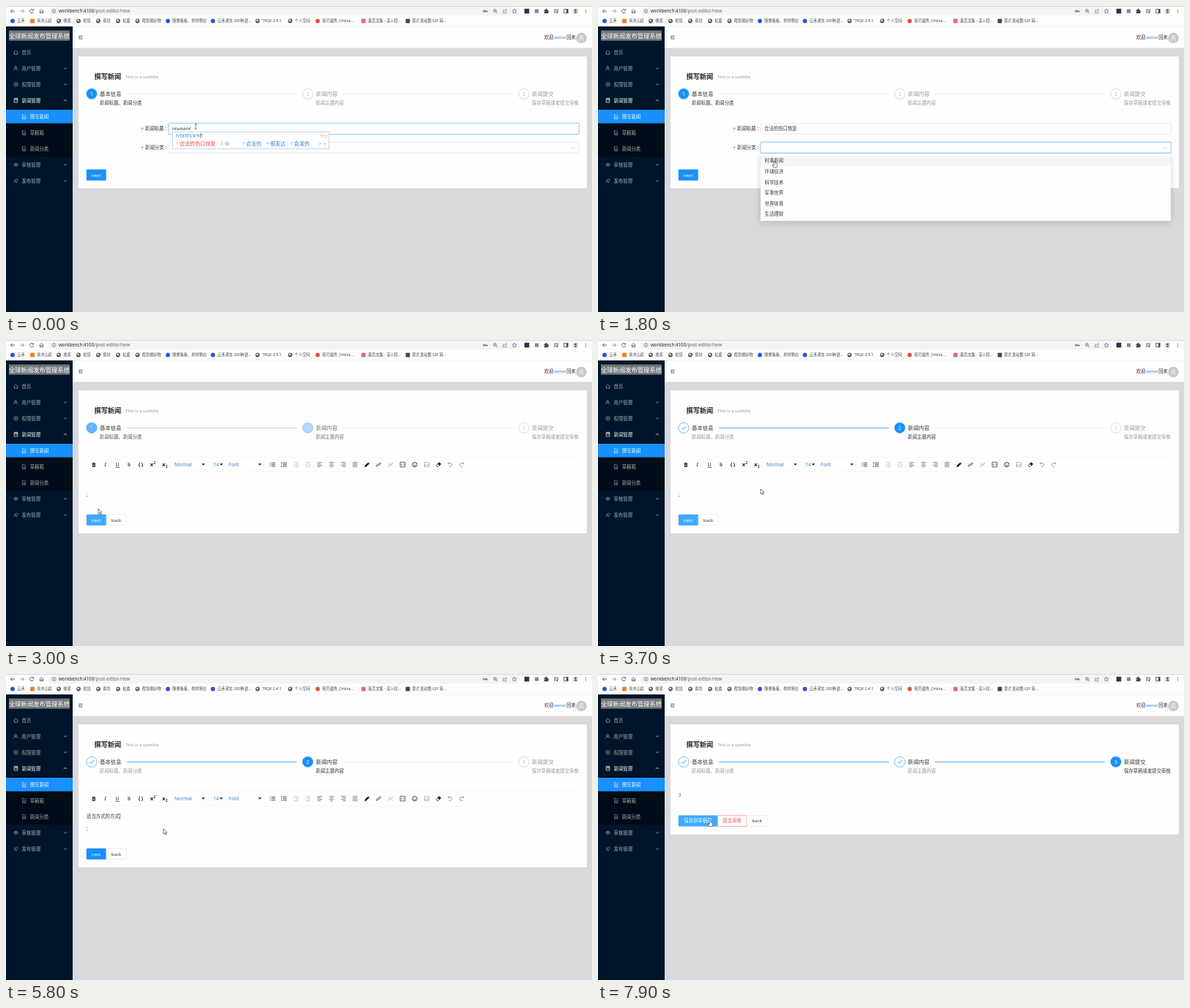
Animation of 800x419 px, one loop 8 s. Source, as an HTML page:

```html
<!DOCTYPE html>
<html lang="zh">
<head>
<meta charset="utf-8">
<title>News editor</title>
<style>
html, body { margin: 0; width: 100%; height: 100%; overflow: hidden; background: #d9d8da; }
svg { display: block; width: 100vw; height: 100vh; }
text { font-family: "Noto Sans", "Noto Sans CJK SC", "Noto Sans CJK", sans-serif; white-space: pre; }
</style>
</head>
<body>
<svg id="stage" viewBox="0 0 800 419"></svg>
<script>
const BLUE = '#1890ff', HOVER = '#40a9ff', INK = '#333', MUTED = '#969696', PALE = '#c4c4c4', WHITE = '#fefefe';
const LOOP = 8000, PAGE_2 = 2900, PAGE_3 = 6450, FADE = 300;

// Drawing helpers; text is placed by its vertical middle.
const text = (x, y, s, fill = INK, size = 6.4, more = '') =>
  `<text x="${x}" y="${y + size * .37}" font-size="${size}" fill="${fill}" ${more}>${s}</text>`;
const rect = (x, y, w, h, fill, more = '') =>
  `<rect x="${x}" y="${y}" width="${w}" height="${h}" fill="${fill}" ${more}/>`;
const disc = (x, y, r, fill, more = '') => `<circle cx="${x}" cy="${y}" r="${r}" fill="${fill}" ${more}/>`;
const path = (d, stroke = '#444', width = .7, fill = 'none') =>
  `<path d="${d}" stroke="${stroke}" stroke-width="${width}" fill="${fill}"/>`;
const at = (x, y, body) => `<g transform="translate(${x} ${y})">${body}</g>`;
const group = (id, body) => `<g id="${id}">${body}</g>`;
const edge = (color, width = .5) => `stroke="${color}" stroke-width="${width}" rx="1"`;
const caret = (id, x, y) => rect(x, y - 4, .6, 8, '#222', `id="${id}"`);
const centered = 'text-anchor="middle"';

function browserBar() {
  const globe = disc(0, 0, 2.9, '#4b4f53') + path('M-2 -.9L0 -1.8 .8 -.4 -.7 .5ZM.4 1.8L2 .3', '#eee', .6, '#eee');
  const dot = color => disc(0, 0, 2.9, color);
  const square = color => rect(-2.9, -2.9, 5.8, 5.8, color);
  const marks = [
    [9, dot('#2c50d8'), '云禾'], [36, square('#f37a22'), '青木山房'], [72, globe, '搜索'], [99, globe, '拾货'],
    [126, globe, '南坊'], [153, globe, '松鹿'], [179.5, globe, '帮您挑好物'], [221, dot('#2c50d8'), '随便看看，样样明白'],
    [282.5, dot('#2c50d8'), '云禾译文-200种语...'], [343.5, globe, 'TRQX 2.4.1'], [388, globe, '个人空间'],
    [425.5, dot('#d9543f'), '轻巧插件_Orbita...'], [488, square('#e86a70'), '墨页文集 - 深入挖...'],
    [548.5, square('#444'), '影片变动图 GIF 转...']
  ];
  const tools = [
    [654, disc(-1.3, 0, 1.3, 'none', 'stroke="#444" stroke-width=".8"') + path('M0 0H3V1.5M1.7 0V1.2', '#444', .9)],
    [668, disc(-.5, -.5, 2, 'none', 'stroke="#555" stroke-width=".7"') + path('M1 1L3 3M-1.4 -.5H.4')],
    [681, path('M-1 -1H-2.6V2.7H2V1M-1 1Q-.6 -1.2 2.5 -1.2M1.2 -2.7L2.8 -1.2 1.2 .3', '#777')],
    [694, path('M0 -3L.9 -1 3 -.8 1.4 .6 1.9 2.8 0 1.6 -1.9 2.8 -1.4 .6 -3 -.8 -.9 -1Z', '#555', .6)],
    [711, rect(-3.3, -3.3, 6.6, 6.6, '#24344f')],
    [724.5, rect(-2.6, -2.6, 5.2, 5.2, '#858a8d')],
    [737.5, path('M-2.7 -1.6H-1Q-1 -3.2 0 -3.2T1 -1.6H2.4V.1Q3.5 0 3.5 .8T2.4 1.6V3H-2.7V1.5Q-1.5 1.5 -1.5 .7T-2.7 0Z', '#333', .3, '#444')],
    [751, path('M-3 -2H1M-3 0H0M-3 2H-1M2 -2V1.5M2 -2H3.5', '#444', .9) + disc(1.2, 1.8, 1.1, '#444')],
    [764.5, rect(-2.7, -2.7, 5.4, 5.4, 'none', 'stroke="#444" stroke-width=".8"') + rect(.5, -2.5, 2, 5, '#444')],
    [777.5, disc(0, 0, 3.8, '#d4dbe8') + disc(0, -1.1, 1.3, '#3c4b68') + path('M-2.2 2.5Q0 -1 2.2 2.5Z', 'none', 0, '#3c4b68')],
    [791.5, [-2, 0, 2].map(y => disc(0, y, .6, '#444')).join('')]
  ];
  return rect(0, 0, 800, 57.5, WHITE) + rect(0, 0, 800, 1, '#d3d6da') + rect(0, 27.7, 800, .5, '#e6e6e6') +
    at(9, 7, path('M3 0H-2.6M0 -2.7L-2.7 0 0 2.7', '#444', .8)) +
    at(22, 7, path('M-3 0H2.6M0 -2.7L2.7 0 0 2.7', '#888', .8)) +
    at(35, 7, path('M2.2 -1.4A2.6 2.6 0 1 0 2.5 .8M2.6 -3V-1H.7', '#444', .8)) +
    at(48.5, 7, path('M-3 .2L0 -2.7 3 .2M-2.1 -.4V2.7H-.7V.7H.7V2.7H2.1V-.4', '#444', .7)) +
    rect(58, 1.5, 643, 11.5, '#f3f4f5', 'rx="5.7"') +
    disc(65.5, 7, 2.5, 'none', 'stroke="#555" stroke-width=".6"') + path('M65.5 6.6V8.5M65.5 5.4V6', '#555', .7) +
    text(72, 7, 'workbench:4100<tspan fill="#666">/post-editor/new</tspan>', '#222', 6.2) +
    tools.map(([x, body]) => at(x, 7, body)).join('') +
    marks.map(([x, icon, label]) => at(x, 20.5, icon) + text(x + 6.3, 20.5, label, '#444', 5.2)).join('');
}

function pageHeader() {
  return path('M99.3 41H104.5M101.8 43H104.5M99.3 45H104.5M101 42L99.5 43 101 44', '#333', .7) +
    text(734.8, 43, `欢迎<tspan fill="${BLUE}" font-size="6">owner</tspan>回来`, INK, 6.3) +
    disc(785.5, 43.8, 7.3, '#c9c9c9') + disc(785.5, 42, 1.8, 'none', 'stroke="#fff" stroke-width=".8"') +
    path('M782.3 47.5Q782.5 44.5 785.5 44.5T788.7 47.5', '#fff', .8);
}

function sidebar() {
  const gray = '#a6adb4';
  const doc = 'M-2 -3H.8L2.2 -1.6V3H-2ZM-.9 0H1.1M-.9 1.5H1.1';
  const rows = [
    [63.5, '首页', 'M-3 .2L0 -2.8 3 .2M-2 -.3V2.7H2V-.3', 0],
    [85.3, '用户管理', 'M-2.8 2.8Q-2.8 .3 -.4 .3T1 1.2M-1.8 -1.2A1.4 1.4 0 1 1 1 -1.2A1.4 1.4 0 1 1 -1.8 -1.2M1.5 1L3 2.8', 1],
    [107.2, '权限管理', 'M-2.8 0A2.8 2.8 0 1 1 2.8 0A2.8 2.8 0 1 1 -2.8 0M-1.2 0H1.3M0 -1.2V1.2', 1],
    [129.2, '新闻管理', 'M-2.3 -2.8H2.3V2.8H-2.3ZM-.8 -2.8V0L.2 -.8 1.2 0V-2.8', -1],
    [217.3, '审核管理', 'M-3.2 0Q0 -4 3.2 0Q0 4 -3.2 0M-1 0A1 1 0 1 1 1 0A1 1 0 1 1 -1 0', 1],
    [239.5, '发布管理', 'M-2.8 2.8L-.6 .6M-2.3 -.7L.8 2.4 1.2 .6 2.8 -1 1 -2.8 -.6 -1.2Z', 1]
  ];
  const subs = [[151.7, '撰写新闻', '#fff'], [173.5, '草稿箱', gray], [195.3, '新闻分类', gray]];
  return rect(0, 28, 91, 391, '#001529') + rect(4, 33.5, 83, 14, '#74787c') +
    text(4, 40.7, '全球新闻发布管理系统', '#fff', 8.3) +
    rect(0, 140.3, 91, 66, '#000c17') + rect(0, 142, 91, 18.6, BLUE) +
    rows.map(([y, label, icon, arrow]) => {
      const color = arrow < 0 ? '#fff' : gray;
      return at(13.5, y, path(icon, color, .7)) +
        text(21.5, y, label, color, 6.4, arrow < 0 ? 'font-weight="500"' : '') +
        (arrow ? at(81, y, path(`M-2 ${-arrow}L0 ${arrow} 2 ${-arrow}`, color, .8)) : '');
    }).join('') +
    subs.map(([y, label, color]) => at(24.5, y, path(doc, color, .6)) + text(32.7, y, label, color)).join('');
}

function steps(active) {
  const list = [[117, '基本信息', '新闻标题、新闻分类'], [412, '新闻内容', '新闻主题内容'], [707, '新闻提交', '保存草稿或者提交审核']];
  return rect(108, 111, 680, 28, WHITE) + list.map(([x, title, note], i) => {
    const done = i < active, now = i === active;
    const mark = done ? path(`M${x - 2.8} 120.4L${x - .8} 122.5 ${x + 3} 118`, BLUE, .9)
      : text(x, 120.4, i + 1, now ? '#fff' : PALE, 7, centered);
    return disc(x, 120.3, 7.1, now ? BLUE : WHITE, `stroke="${done || now ? BLUE : PALE}" stroke-width=".6"`) + mark +
      text(x + 11, 120.3, title, done || now ? INK : MUTED, 7.4) +
      text(x + 11, 133, note, now ? INK : MUTED) +
      (i < 2 ? rect(x + 48, 120, 232, 1, done ? '#4ba8fb' : '#efefef') : '');
  }).join('');
}

const button = (id, x, y, w, label, kind = 'plain') => {
  const [fill, line, ink] = { main: [BLUE, BLUE, '#fff'], plain: [WHITE, '#d9d9d9', INK], danger: [WHITE, '#ff4d4f', '#ff4d4f'] }[kind];
  return rect(x, y, w, 14.7, fill, `id="${id}" ${edge(line)}`) +
    text(x + w / 2, y + 7.3, label, ink, /[a-z]/.test(label) ? 6.1 : 6.4, centered);
};
const panel = bottom => rect(99, 69, 694, bottom - 69, WHITE);
const field = (id, y) => rect(221.4, y - .6, 561.4, 15.9, 'none', `id="${id}Glow" stroke="#d1e9ff" stroke-width="1" rx="1"`) +
  rect(222, y, 560.2, 14.7, WHITE, `id="${id}" ${edge('#d9d9d9')}`);

function formPage() {
  const label = (y, s) => text(184.5, y + .8, '*', '#ff4d4f', 6.4) + text(190, y, s + ' :');
  const options = ['时事新闻', '环球经济', '科学技术', '军事世界', '世界体育', '生活理财'];
  const list = rect(222, 203, 560, 91.3, WHITE, 'rx="1" style="filter:drop-shadow(0 2px 4px rgba(0,0,0,.16))"') +
    rect(222, 204.8, 560, 14.6, '#f5f5f5', 'id="optionHover"') +
    options.map((s, i) => text(227.5, 212.1 + i * 14.6, s)).join('');
  return panel(249.5) + label(168, '新闻标题') + label(193.8, '新闻分类') +
    field('title', 160.7) + field('category', 186.5) +
    path('M772 192.8L774.2 195 776.4 192.8', '#bfbfbf', .7) +
    group('rawTitle', text(227, 168, 'hfadskhf', INK, 6.1)) +
    group('finalTitle', text(227, 168, '合法的伤口恢复')) + caret('titleCaret', 272, 168) +
    group('chosen', text(227, 193.8, '环球经济')) +
    button('next1', 110, 224, 26.5, 'next', 'main') + group('dropdown', list);
}

function toolbar() {
  const y = 170.6, dark = '#222', dim = '#bbb';
  const glyph = (x, s, more = '', size = 7.6) => text(x, y, s, dark, size, centered + ' ' + more);
  const lines = (x, spans, color) => at(x, y, path(spans.map(([a, b], i) => `M${a} ${i * 2 - 3}H${b}`).join(''), color, .7));
  const full = [-3.3, 3.3];
  const icon = (x, d, color = dark, fill = 'none', w = .8) => at(x, y, path(d, color, w, fill));
  const pick = (x, w, s) => rect(x, 164, w, 13.2, 'none', edge('#f3f3f3', .4)) + text(x + 2, y, s, '#3a83c9', 6.7) +
    icon(x + w - 5.5, 'M-2.3 -1.4H2.3L0 1.2Z', 'none', dark);
  const bullets = [-2.2, 0, 2.2].map(d => `M-3.7 ${d}H-2.7M-1.5 ${d}H3.7`).join('');
  const chain = 'M-.6 1.2L-2 2.6Q-3 2.8 -3.2 1.6L-1 -.7Q0 -1 .6 0M.6 -1.2L2 -2.6Q3 -2.8 3.2 -1.6L1 .7Q0 1 -.6 0';
  return rect(110, 160.7, 672, 19.8, WHITE, edge('#f1f1f1')) +
    glyph(120, 'B', 'font-weight="900"', 8) + glyph(135.5, 'I', 'font-style="italic" font-family="Noto Serif, serif"') +
    glyph(152, 'U', 'text-decoration="underline"', 7) + glyph(168, 'S', 'text-decoration="line-through"', 7) +
    glyph(184, '{ }', 'font-weight="700"', 6.4) +
    glyph(199, 'x', 'font-weight="700"') + text(201.5, 168, '2', dark, 4.4, 'font-weight="700"') +
    glyph(215.5, 'x', 'font-weight="700"') + text(218, 173, '2', dark, 4.4, 'font-weight="700"') +
    pick(228, 47, 'Normal') + pick(281, 18.5, '14') + pick(302, 50, 'Font') +
    icon(364, bullets) + icon(379.5, bullets + 'M-3.2 -3V-1.4M-3.2 1.4V3') +
    lines(396, [full, [0, 3.3], [0, 3.3], full], dim) + icon(396, 'M-3.3 0H-1', dim) +
    lines(412, [full, [0, 3.3], [0, 3.3], full], dim) + icon(412, 'M-3.3 0H-1', dim) +
    lines(428.5, [full, [-3.3, 1], full, [-3.3, 1]], '#555') + lines(444.5, [full, [-2, 2], full, [-2, 2]], '#555') +
    lines(460.5, [full, [-1, 3.3], full, [-1, 3.3]], '#555') + lines(476.5, [full, full, full, full], '#555') +
    icon(493, 'M-3.2 3.2L-2.4 1 1.2 -2.4 2.5 -1.2 -1 2.4ZM1.7 -3L3.2 -1.5', dark, dark) +
    icon(508.5, chain) + icon(525, chain + 'M-3 -3L3 3', dim) +
    icon(541.5, 'M-3.4 -3.2H3.4V3.2H-3.4ZM-1 -1.2L-2 0 -1 1.2M1 -1.2L2 0 1 1.2', dark, 'none', .7) +
    icon(558, 'M-3.3 0A3.3 3.3 0 1 1 3.3 0A3.3 3.3 0 1 1 -3.3 0M-1.7 .9Q0 2.9 1.7 .9M-1.3 -1.5V-.5M1.3 -1.5V-.5') +
    icon(574.5, 'M-3 -3H3V3H-3ZM-3 2L-1 0 .5 1.3 1.6 .2 3 1.6', '#888', 'none', .6) +
    icon(590.5, 'M-3 1L.5 -2.8 3 -.8 -.5 2.8H-2Z') + icon(590.5, 'M-1.2 -.9L.5 -2.8 3 -.8 1.2 1.2Z', dark, dark) +
    icon(606, 'M-2.4 -3V-.9H-.3M-2.3 -1A2.6 2.6 0 1 1 -1.5 2.2', '#888') +
    icon(622, 'M2.4 -3V-.9H.3M2.3 -1A2.6 2.6 0 1 0 1.5 2.2', '#888');
}

// Input-method window: spelling on top, then five numbered candidates, the second an emoji.
function ime(id, x, y, spelling, compWidth, words, eyeGap) {
  let cx = x + 5, body = '';
  words.forEach((word, i) => {
    const cy = y + 16.2;
    if (i === 1) {
      body += text(cx, cy, 2, '#7aa5d8', 5.4) + at(cx + 8.7, cy, path('M-3.6 0Q0 -4 3.6 0Q0 4 -3.6 0', '#5b9ddd', .6) + disc(0, 0, .9, '#5b9ddd'));
      cx += eyeGap;
    }
    body += text(cx, cy, i ? i + 2 : 1, i ? '#7aa5d8' : '#f0705c', 5.4) + text(cx + 4.7, cy, word, i ? '#2b7fd4' : '#ef4a35', 7.1);
    cx += 11.6 + word.length * 7.1;
  });
  const right = cx + 19.5;
  return group(id, rect(x + .5, y, right - x - .5, 23.4, WHITE, `stroke="#a5d0f1" stroke-width=".8"`) +
    path(`M${right - 13} ${y + 4}q3 -4 6 -1.5t6 -.5v6q-4 3 -6 1t-7 0q4 -2 1 -5Z`, 'none', 0, '#fbece5') +
    path(`M${right - 12} ${y + 5}h9`, '#f0c7b4', .6) +
    text(x + 5, y + 5.2, spelling, '#2b7fd4', 6.8) + rect(x + 5 + compWidth, y + 1.6, .5, 7, '#333') + body +
    path(`M${right - 13} ${y + 14.6}l1.6 1.6 -1.6 1.6M${right - 8} ${y + 15.6}l1.8 1.6 1.8 -1.6`, '#3d8bd8', .7));
}

const LETTERS = 'sdfsdfs';
const GUESSES = ['是,说,时,上', '速度,深度,湿度,是的', '说的法,是对方,双度分,三等分', '胜多负少,速递分散,水电费是,双打方式',
  '收到发送到,水电费,胜多负少,速递分散', '水电费水电费,胜多负少,速递分散,速递发送', '适当方式的方式,胜多负少,速递分散,速递发送'];

function editorPage() {
  const spelled = n => [...LETTERS.slice(0, n)].join("'");
  const widths = [0, 3.5, 9, 12.5, 17, 22, 24, 29];
  return panel(264.7) + toolbar() + text(110, 212, ';') +
    GUESSES.map((words, i) => group('typed' + (i + 1),
      text(110, 195, LETTERS.slice(0, i + 1), INK, 6.1) +
      ime('ime' + (i + 1), 110, 198.8, spelled(i + 1), widths[i + 1], words.split(','), 24))).join('') +
    group('article', text(110, 195, '适当方式的方式')) + caret('articleCaret', 155, 195) +
    button('next2', 110, 239, 26.5, 'next', 'main') + button('back2', 137, 239, 27, 'back');
}

const submitPage = () => panel(219.6) + text(109.7, 166, '3', '#555', 6.2) +
  button('save', 110, 193.8, 53, '保存到草稿箱', 'main') +
  button('submit', 163.3, 193.8, 39.7, '提交审核', 'danger') + button('back3', 203.3, 193.8, 27.7, 'back');

const pointers = {
  arrow: path('M0 0V7L1.6 5.6 2.7 8 3.8 7.5 2.7 5.1H4.9Z', '#222', .6, '#fff'),
  hand: path('M-.9 .9Q-.9 0 0 0T.9 .9V3.3L3.2 4Q4 4.3 3.9 5.2L3.2 8.8H-1.2L-3.1 5.7Q-2.6 4.6 -.9 6Z', '#222', .6, '#fff'),
  beam: path('M-1.5 -3.4H1.5M0 -3.4V3.4M-1.5 3.4H1.5', '#222', .6)
};

document.getElementById('stage').innerHTML =
  rect(0, 0, 800, 419, '#d9d8da') + browserBar() + pageHeader() + sidebar() +
  group('page0', formPage()) + group('page1', editorPage()) + group('page2', submitPage()) +
  text(120.5, 97, '撰写新闻', '#222', 9.2, 'font-weight="600"') + text(163, 97, 'This is a subtitle', MUTED, 6) +
  [0, 1, 2].map(i => group('steps' + i, steps(i))).join('') +
  ime('titleIme', 227, 172.3, "h'fa'd's'k'h'f", 33, ['合法的伤口恢复', '合法的', '很发达', '会发的'], 29.5) +
  group('pointer', Object.entries(pointers).map(([k, body]) => group(k, body)).join(''));

// Pointer path: time, x, y, shape.
const moves = [
  [0, 259, 165, 'beam'], [800, 259, 165, 'beam'], [1000, 252, 178, 'arrow'], [1150, 242, 190, 'hand'],
  [1350, 240, 195, 'hand'], [1600, 240, 195, 'hand'], [2000, 242, 229, 'hand'], [2150, 242, 229, 'arrow'],
  [2300, 242, 229, 'arrow'], [2540, 131, 231, 'hand'], [2700, 126, 231, 'hand'], [2900, 126, 231, 'arrow'],
  [3300, 126, 231, 'arrow'], [3680, 222, 204, 'arrow'], [5200, 222, 204, 'arrow'], [5600, 215, 212, 'arrow'],
  [5850, 215, 212, 'arrow'], [6200, 124, 246, 'hand'], [6450, 124, 246, 'arrow'], [6800, 124, 246, 'arrow'],
  [7400, 186, 200, 'hand'], [7500, 186, 200, 'hand'], [7700, 153, 200, 'hand'], [LOOP, 153, 200, 'hand']
];

const el = id => document.getElementById(id);
const show = (id, on) => { el(id).style.display = on ? '' : 'none'; };
const paint = (id, key, value) => el(id).setAttribute(key, value);
const light = (id, on) => ['fill', 'stroke'].forEach(key => paint(id, key, on ? HOVER : BLUE));
const ramp = (t, start, span) => Math.min(1, Math.max(0, (t - start) / span));
const blink = (t, since) => t >= since && (t - since) % 1000 < 500;

function movePointer(t) {
  const i = moves.findLastIndex(m => m[0] <= t);
  const [t0, x0, y0, shape] = moves[i], [t1, x1, y1] = moves[i + 1];
  const p = ramp(t, t0, t1 - t0), k = p * p * (3 - 2 * p), y = y0 + (y1 - y0) * k;
  paint('pointer', 'transform', `translate(${x0 + (x1 - x0) * k} ${y})`);
  Object.keys(pointers).forEach(name => show(name, name === shape));
  return y;
}

function render(t) {
  const y = movePointer(t);
  const page = t < PAGE_2 ? 0 : t < PAGE_3 ? 1 : 2;
  [0, 1, 2].forEach(i => {
    show('page' + i, i === page);
    const start = [-FADE, PAGE_2, PAGE_3][i];
    el('steps' + i).style.opacity = ramp(t, start, FADE);
  });

  const committed = 100, opened = 1500, picked = 2050;
  show('titleIme', t < committed);
  show('rawTitle', t < committed);
  show('finalTitle', t >= committed);
  show('titleCaret', t < opened && blink(t, committed));
  show('titleGlow', t < opened);
  paint('title', 'stroke', t < opened ? HOVER : '#d9d9d9');
  show('categoryGlow', t >= opened);
  paint('category', 'stroke', t >= 1150 ? HOVER : '#d9d9d9');
  const open = ramp(t, opened, 150) * (1 - ramp(t, picked, 150));
  show('dropdown', open > 0);
  el('dropdown').style.opacity = open;
  paint('dropdown', 'transform', `translate(0 ${203 * (.2 - .2 * open)}) scale(1 ${.8 + .2 * open})`);
  paint('optionHover', 'y', y > 219 ? 219.4 : 204.8);
  show('chosen', t >= picked);
  light('next1', t > 2530);

  const finished = 5350;
  const typed = t < 4050 || t >= finished ? 0 : Math.min(7, 1 + Math.floor((t - 4050) / 105));
  GUESSES.forEach((_, i) => show('typed' + (i + 1), typed === i + 1));
  show('article', t >= finished);
  show('articleCaret', blink(t, finished));
  light('next2', t < 3950 || t > 6150);
  light('save', t >= 7600);
}

function tick(now) {
  render(now % LOOP);
  requestAnimationFrame(tick);
}
render(0);
requestAnimationFrame(tick);
</script>
</body>
</html>
```
